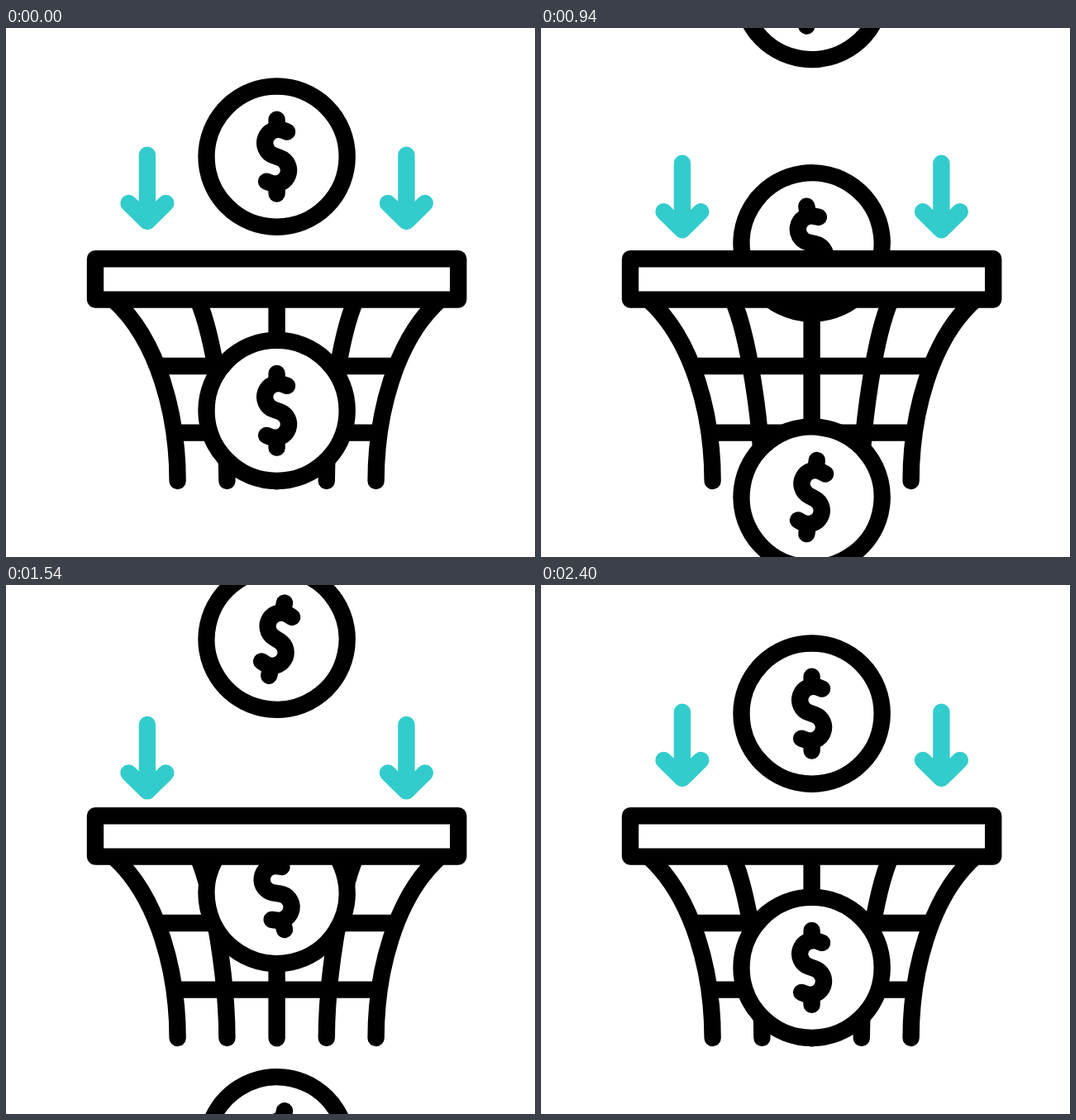
An HTML page for the animation above (2.42 s loop, 640 px wide and 640 px high).

```html
<!DOCTYPE html>
<html lang="en">
<head>
<meta charset="utf-8">
<title>Coins through a hoop</title>
<style>
  html, body { margin: 0; height: 100%; overflow: hidden; background: #fff; }
  svg { display: block; width: 100%; height: 100%; }
</style>
</head>
<body>
<svg viewBox="0 0 640 640" fill="none" stroke="#000" stroke-width="20.4" stroke-linecap="round" stroke-linejoin="round">
  <defs>
    <g id="strands">
      <path d="M130 328.6C185 378 207.6 470 207.6 548"/>
      <path d="M232 328.6C251 372 267.4 480 267.4 548"/>
    </g>
    <path id="arrow" d="M0 153.6V234M-22.4 212L0 234L22.4 212"/>
    <g id="dollar">
      <path d="M0 -45V-34M0 45V34"/>
      <path transform="rotate(20)" d="M1.5 -32.5H-4A16.25 16.25 0 0 0 -4 0H4A16.25 16.25 0 0 1 4 32.5H-1.5"/>
    </g>
  </defs>

  <g id="net">
    <use href="#strands"/>
    <use href="#strands" transform="matrix(-1 0 0 1 655.2 0)"/>
    <path d="M327.6 328.6V548.2M184 409H471.2M204 489.6H451.2"/>
  </g>

  <g class="coin"><circle r="85.1" fill="#fff"/><use href="#dollar"/></g>
  <g class="coin"><circle r="85.1" fill="#fff"/><use href="#dollar"/></g>
  <g class="coin"><circle r="85.1" fill="#fff"/><use href="#dollar"/></g>

  <g id="arrows" stroke="#3cc">
    <use href="#arrow" x="170.9"/>
    <use href="#arrow" x="484.4"/>
  </g>

  <path id="hoop" fill="#fff" d="M108 279.2H547.2V328.6H108Z"/>
</svg>
<script>
  const LOOP = 2420, TRAVEL = 2400, SWING = 600;
  const SPACING = 307.3, FIRST_Y = 155.6 - SPACING;
  const coins = document.querySelectorAll('.coin');
  const arrows = document.getElementById('arrows');

  const smooth = x => x * x * (3 - 2 * x);

  function draw(now) {
    const t = Math.min(now % LOOP, TRAVEL);
    const drop = smooth(t / TRAVEL);
    // Rises and falls twice per loop; drives both the arrows and the tilt.
    const swing = smooth(1 - Math.abs(1 - (t / SWING) % 2));

    coins.forEach((coin, i) => {
      const y = FIRST_Y + SPACING * (i + drop);
      const tilt = (i % 2 ? -20 : 20) * swing;
      coin.setAttribute('transform', `translate(327.6 ${y}) rotate(${tilt})`);
    });
    arrows.setAttribute('transform', `translate(0 ${25.6 * swing})`);
  }

  const start = performance.now();
  function tick() {
    draw(performance.now() - start);
    requestAnimationFrame(tick);
  }
  tick();
</script>
</body>
</html>
```
